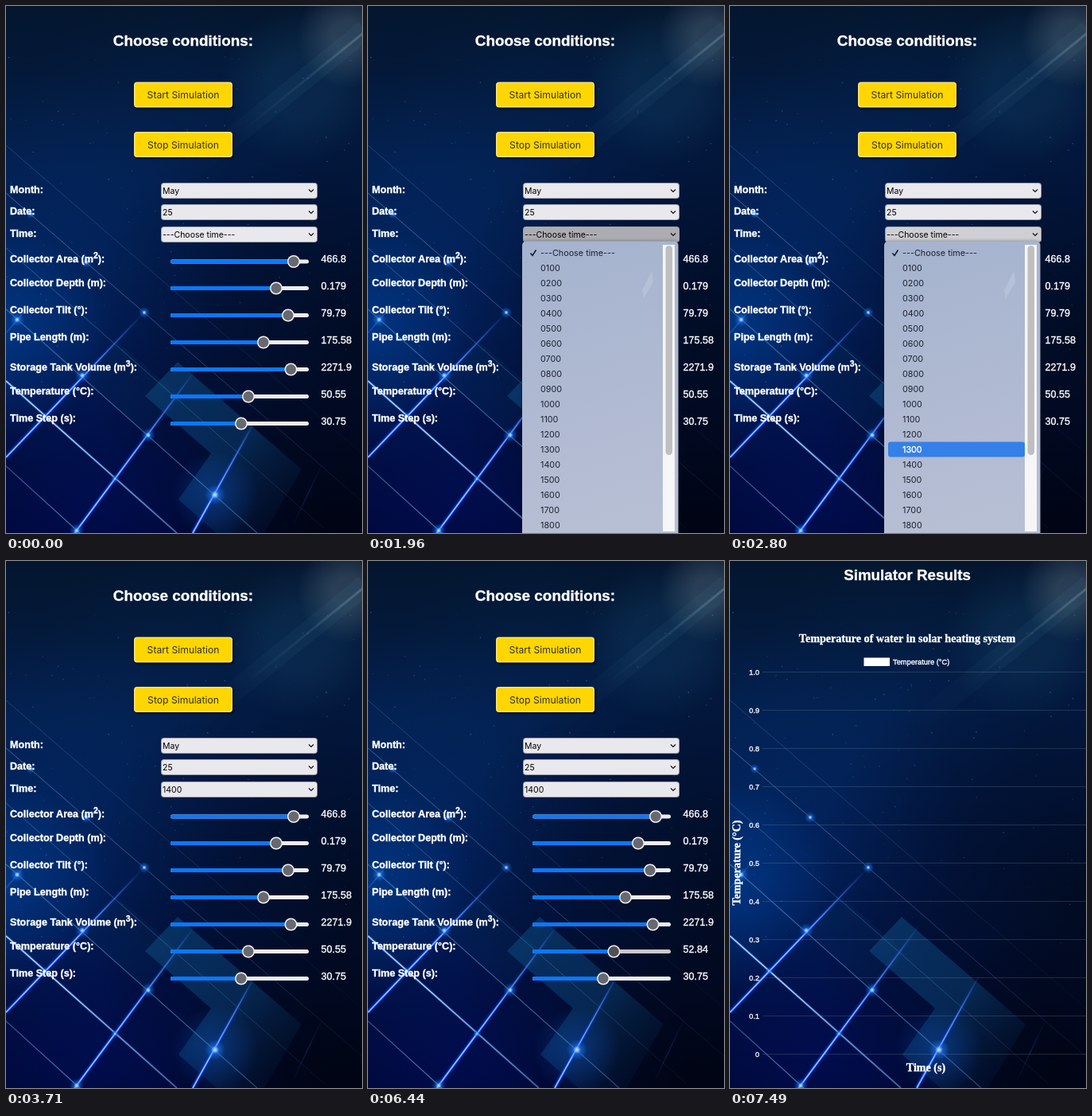
An HTML page with a canvas for the animation above (8000 ms loop, 448 by 662 pixels).

```html
<!DOCTYPE html>
<html lang="en">
<head>
<meta charset="utf-8">
<title>Simulator</title>
<style>
html, body { margin: 0; width: 100%; height: 100%; overflow: hidden; background: #02143a; }
canvas { display: block; width: 448px; height: 662px; }
</style>
</head>
<body>
<canvas id="stage" width="448" height="662"></canvas>
<script>
const W = 448, H = 662, LOOP = 8000;
const SANS = '"Liberation Sans", Arial, sans-serif';
const SERIF = '"Liberation Serif", "Times New Roman", serif';
const UI = 'Inter, Roboto, sans-serif';
const ctx = document.getElementById('stage').getContext('2d');

// White text gets a hairline outline for a slightly heavier weight.
function text(c, str, x, y, font, color = '#fff', align = 'left') {
  c.font = font;
  c.fillStyle = color;
  c.textAlign = align;
  c.fillText(str, x, y);
  if (color === '#fff') {
    c.strokeStyle = color;
    c.lineWidth = 0.35;
    c.strokeText(str, x, y);
  }
}

function box(c, x, y, w, h, r, fill) {
  c.beginPath();
  c.roundRect(x, y, w, h, r);
  c.fillStyle = fill;
  c.fill();
}

function poly(c, points, fill) {
  c.beginPath();
  points.forEach(p => c.lineTo(p[0], p[1]));
  c.closePath();
  c.fillStyle = fill;
  c.fill();
}

function glow(c, x, y, r, rgb, alpha, core = 0) {
  const g = c.createRadialGradient(x, y, r * core, x, y, r);
  g.addColorStop(0, `rgba(${rgb},${alpha})`);
  g.addColorStop(1, `rgba(${rgb},0)`);
  c.fillStyle = g;
  c.fillRect(x - r, y - r, 2 * r, 2 * r);
}

// Line whose opacity runs through the given stops.
function ray(c, x1, y1, x2, y2, rgb, alphas, width) {
  const g = c.createLinearGradient(x1, y1, x2, y2);
  alphas.forEach((a, i) => g.addColorStop(i / (alphas.length - 1), `rgba(${rgb},${a})`));
  c.strokeStyle = g;
  c.lineWidth = width;
  c.beginPath();
  c.moveTo(x1, y1);
  c.lineTo(x2, y2);
  c.stroke();
}

function neon(c, x1, y1, x2, y2, alphas) {
  ray(c, x1, y1, x2, y2, '0,50,230', alphas.map(a => a * 0.35), 7);
  ray(c, x1, y1, x2, y2, '30,105,255', alphas.map(a => a * 0.75), 3);
  ray(c, x1, y1, x2, y2, '185,222,255', alphas.map(a => a * 0.9), 1.3);
}

function makeBackdrop() {
  const cv = document.createElement('canvas');
  cv.width = W;
  cv.height = H;
  const c = cv.getContext('2d');
  const sky = c.createLinearGradient(0, 0, 0, H);
  sky.addColorStop(0, '#04162e');
  sky.addColorStop(0.3, '#031c48');
  sky.addColorStop(0.6, '#02174a');
  sky.addColorStop(1, '#000838');
  c.fillStyle = sky;
  c.fillRect(0, 0, W, H);
  glow(c, 40, 330, 250, '0,60,140', 0.35);
  glow(c, 0, 410, 130, '0,85,190', 0.4);
  glow(c, 200, 170, 190, '0,50,110', 0.2);
  glow(c, 110, 620, 170, '0,18,105', 0.4);
  glow(c, 450, 430, 350, '1,9,26', 0.85);
  glow(c, 420, 670, 220, '0,4,16', 0.85, 0.15);

  // Lens flare
  glow(c, 370, 100, 100, '24,84,122', 0.24, 0.4);
  glow(c, 430, 38, 64, '105,125,140', 0.36, 0.3);
  ray(c, 452, 30, 235, 206, '60,120,155', [0.12, 0.09, 0], 26);
  ray(c, 452, 32, 300, 155, '150,180,195', [0.32, 0.1, 0], 3);

  let seed = 11;
  const rnd = () => (seed = (seed * 16807) % 2147483647) / 2147483647;
  for (let i = 0; i < 130; i++) {
    c.fillStyle = `rgba(100,160,215,${0.12 + rnd() * 0.4})`;
    const s = 0.6 + rnd() * 0.8;
    c.fillRect(rnd() * W, 60 + rnd() * 420, s, s);
  }

  poly(c, [[96, 464], [140, 422], [222, 493], [179, 539]], 'rgba(10,70,120,.13)');
  const teal = c.createLinearGradient(195, 470, 355, 640);
  teal.addColorStop(0, 'rgba(14,78,132,.5)');
  teal.addColorStop(0.55, 'rgba(12,72,124,.45)');
  teal.addColorStop(1, 'rgba(8,45,85,.12)');
  poly(c, [[216, 447], [372, 582], [325, H], [265, H], [217, 620], [258, 562], [175, 490]], teal);
  glow(c, 263, 614, 55, '15,75,175', 0.5);

  // Thin descending lines
  const thin = '80,155,205';
  ray(c, 0, 175, 448, 562, thin, [0.3, 0.2, 0.03], 1);
  ray(c, 0, 235, 448, 622, thin, [0.6, 0.5, 0.3, 0.08], 1);
  ray(c, 0, 304, 400, 656, thin, [0.45, 0.4, 0.3, 0.08], 1);
  ray(c, 0, 381, 316, 662, thin, [0.55, 0.6, 0.6, 0.45], 1.1);
  ray(c, 0, 578, 95, 664, thin, [0.5, 0.8], 1.2);
  ray(c, 0, 471, 215, 662, '60,130,255', [0.5, 0.4, 0.15], 3.2);
  ray(c, 0, 471, 215, 662, '190,228,255', [0.9, 0.95, 0.6, 0.4], 1.4);

  // Bright ascending lines
  neon(c, 0, 567, 172, 387, [0.9, 1, 0.9, 0.35, 0]);
  neon(c, 85, 664, 238, 458, [1, 1, 0.8, 0.35, 0]);
  neon(c, 235, 662, 314, 520, [1, 1, 0.65, 0.35, 0]);
  ray(c, 0, 411, 28, 378, '40,120,240', [0.3, 0.6, 0], 1.5);
  ray(c, 360, 655, 398, 575, '30,90,170', [0, 0.3, 0], 1.5);

  const nodes = [[31, 261, 6], [101, 322, 7], [174, 385, 7], [14, 394, 9],
    [96, 464, 9], [179, 539, 9], [263, 614, 13], [89, 659, 9], [49, 515, 5], [137, 594, 5]];
  for (const [x, y, r] of nodes) {
    glow(c, x, y, r, '30,125,255', 0.8);
    glow(c, x, y, r * 0.38, '205,235,255', 1);
  }
  return cv;
}

const backdrop = makeBackdrop();

const sliders = [
  ['Collector Area (m', '2', 321.5, 362, '466.8'],
  ['Collector Depth (m):', '', 352, 340, '0.179'],
  ['Collector Tilt (°):', '', 386, 355, '79.79'],
  ['Pipe Length (m):', '', 420, 324, '175.58'],
  ['Storage Tank Volume (m', '3', 457.5, 358.5, '2271.9'],
  ['Temperature (°C):', '', 487.5, 305, '50.55'],
  ['Time Step (s):', '', 521.5, 296, '30.75']
];
const TEMP = 5;

// Each track lists [start time, value]; the last one reached is valid.
const pressTrack = [[0, ''], [1470, 'hover'], [1960, 'active'], [2030, 'hover'], [3640, ''], [6650, 'hover'], [6720, '']];
const hoverTrack = [[0, -1], [4760, 0], [4830, 1], [4900, 2], [4970, 3], [5250, 4], [5320, 6],
  [5390, TEMP], [6510, 3], [6580, 0], [6650, -1]];
const at = (track, t) => track.reduce((v, k) => t >= k[0] ? k[1] : v, track[0][1]);
const steps = (t, start, count) => Math.max(0, Math.min(count, Math.floor((t - start) / 70) + 1));

function button(label, y, hot) {
  ctx.save();
  ctx.shadowColor = 'rgba(0,0,0,.6)';
  ctx.shadowOffsetX = ctx.shadowOffsetY = 2;
  ctx.shadowBlur = 2;
  box(ctx, 161, y, 124, 32, 4, '#ffe67a');
  ctx.restore();
  box(ctx, 162.5, y + 1.5, 121, 29, 2.5, hot ? '#e6bd00' : '#ffd600');
  text(ctx, label, 223, y + 20.5, '12.2px ' + UI, '#2f2f35', 'center');
}

function select(label, value, y, state) {
  const fills = { hover: '#d0d0d4', active: '#adadb1' };
  text(ctx, label, 5, y + 13, 'bold 12.6px ' + SANS);
  box(ctx, 195, y, 197, 20, 4, '#a2a2ae');
  box(ctx, 196, y + 1, 195, 18, 3, fills[state] || '#e9e9ed');
  text(ctx, value, 197, y + 13.5, '10.5px ' + UI, '#000');
  ctx.strokeStyle = '#111';
  ctx.lineWidth = 1.2;
  ctx.beginPath();
  ctx.moveTo(381, y + 8.5);
  ctx.lineTo(384, y + 11.5);
  ctx.lineTo(387, y + 8.5);
  ctx.stroke();
}

function slider([label, sup, base, x, value], i, hot) {
  const y = 321 + 34 * i - (i > 0 ? 0.5 : 0);
  const font = 'bold 12.6px ' + SANS;
  text(ctx, label, 5, base, font);
  if (sup) {
    let end = 5 + ctx.measureText(label).width;
    text(ctx, sup, end, base - 4.5, 'bold 10.5px ' + SANS);
    end += ctx.measureText(sup).width;
    text(ctx, '):', end, base, font);
  }
  box(ctx, 207, y - 2.5, 174, 5, 2.5, hot ? '#c9c9cd' : '#ececf0');
  box(ctx, 207, y - 2.5, x - 207, 5, 2.5, '#0a78fa');
  box(ctx, x - 8, y - 8, 16, 16, 8, '#f2f2f4');
  box(ctx, x - 6.5, y - 6.5, 13, 13, 6.5, hot ? '#505057' : '#676870');
  text(ctx, value, 396.5, 321.5 + 34 * i, '12.6px ' + SANS);
}

function dropdown(pick) {
  ctx.save();
  ctx.shadowColor = 'rgba(0,0,0,.4)';
  ctx.shadowBlur = 4;
  const g = ctx.createLinearGradient(194, 296, 300, 662);
  g.addColorStop(0, '#a5b3ce');
  g.addColorStop(0.6, '#b0bad2');
  g.addColorStop(1, '#b7bfd4');
  box(ctx, 194, 295.5, 196.5, 372, 5, g);
  ctx.restore();
  poly(ctx, [[357, 333], [359, 347], [347, 367], [345, 357]], 'rgba(205,212,226,.35)');
  box(ctx, 371, 300, 15, 360, 0, '#f6f6f8');
  box(ctx, 374.5, 301, 8.5, 263, 4.2, '#bfbfc2');
  for (let i = 0; i <= 18; i++) {
    const y = 310 + 19 * i, on = i === pick;
    if (on) box(ctx, 199, y - 9.5, 172, 19, 3, '#3480e8');
    const label = i ? String(i * 100).padStart(4, '0') : '---Choose time---';
    text(ctx, label, 217, y + 4, '10.8px ' + UI, on ? '#fff' : '#1d2230');
  }
  ctx.strokeStyle = '#111827';
  ctx.lineWidth = 1.5;
  ctx.beginPath();
  ctx.moveTo(204.5, 310.5);
  ctx.lineTo(207, 313.5);
  ctx.lineTo(211.5, 306.5);
  ctx.stroke();
}

function form(t) {
  text(ctx, 'Choose conditions:', 223, 49.5, 'bold 18.9px ' + SANS, '#fff', 'center');
  button('Start Simulation', 95.5, t >= 7070);
  button('Stop Simulation', 158, false);
  select('Month:', 'May', 222, '');
  select('Date:', '25', 249, '');
  select('Time:', t < 3570 ? '---Choose time---' : '1400', 277, at(pressTrack, t));
  const hot = at(hoverTrack, t);
  const drag = steps(t, 5880, 4);
  sliders.forEach((s, i) => {
    const row = s.slice();
    if (i === TEMP) {
      row[3] += drag * 1.1;
      row[4] = (50.55 + drag * 0.5725).toFixed(2);
    }
    slider(row, i, i === hot);
  });
  if (t >= 1960 && t < 3570) {
    dropdown(t < 2380 ? -1 : t < 2940 ? steps(t, 2380, 7) * 2 - 1 : 14);
  }
}

function chart() {
  const bold = 'bold 14.1px ' + SERIF, small = '9.3px ' + SANS;
  text(ctx, 'Temperature of water in solar heating system', 223, 101.5, bold, '#fff', 'center');
  box(ctx, 168.5, 121.5, 32.5, 10.5, 0, '#fff');
  text(ctx, 'Temperature (°C)', 205, 130, small);
  for (let i = 0; i <= 10; i++) {
    const y = 139.5 + 48 * i;
    ctx.fillStyle = 'rgba(150,180,190,.2)';
    ctx.fillRect(41, y - 0.5, W - 41, 1);
    text(ctx, i < 10 ? (1 - i / 10).toFixed(1) : '0', 37, y + 3.3, small, '#fff', 'right');
  }
  text(ctx, 'Time (s)', 246.5, 641, bold, '#fff', 'center');
  ctx.save();
  ctx.translate(13, 379);
  ctx.rotate(-Math.PI / 2);
  text(ctx, 'Temperature (°C)', 0, 0, bold, '#fff', 'center');
  ctx.restore();
}

function draw(t) {
  ctx.drawImage(backdrop, 0, 0);
  if (t < 7350) return form(t);
  text(ctx, 'Simulator Results', 223, 23.5, 'bold 18.8px ' + SANS, '#fff', 'center');
  if (t >= 7490) chart();
}

const start = performance.now();
function tick() {
  draw((performance.now() - start) % LOOP);
  requestAnimationFrame(tick);
}
tick();
</script>
</body>
</html>
```
